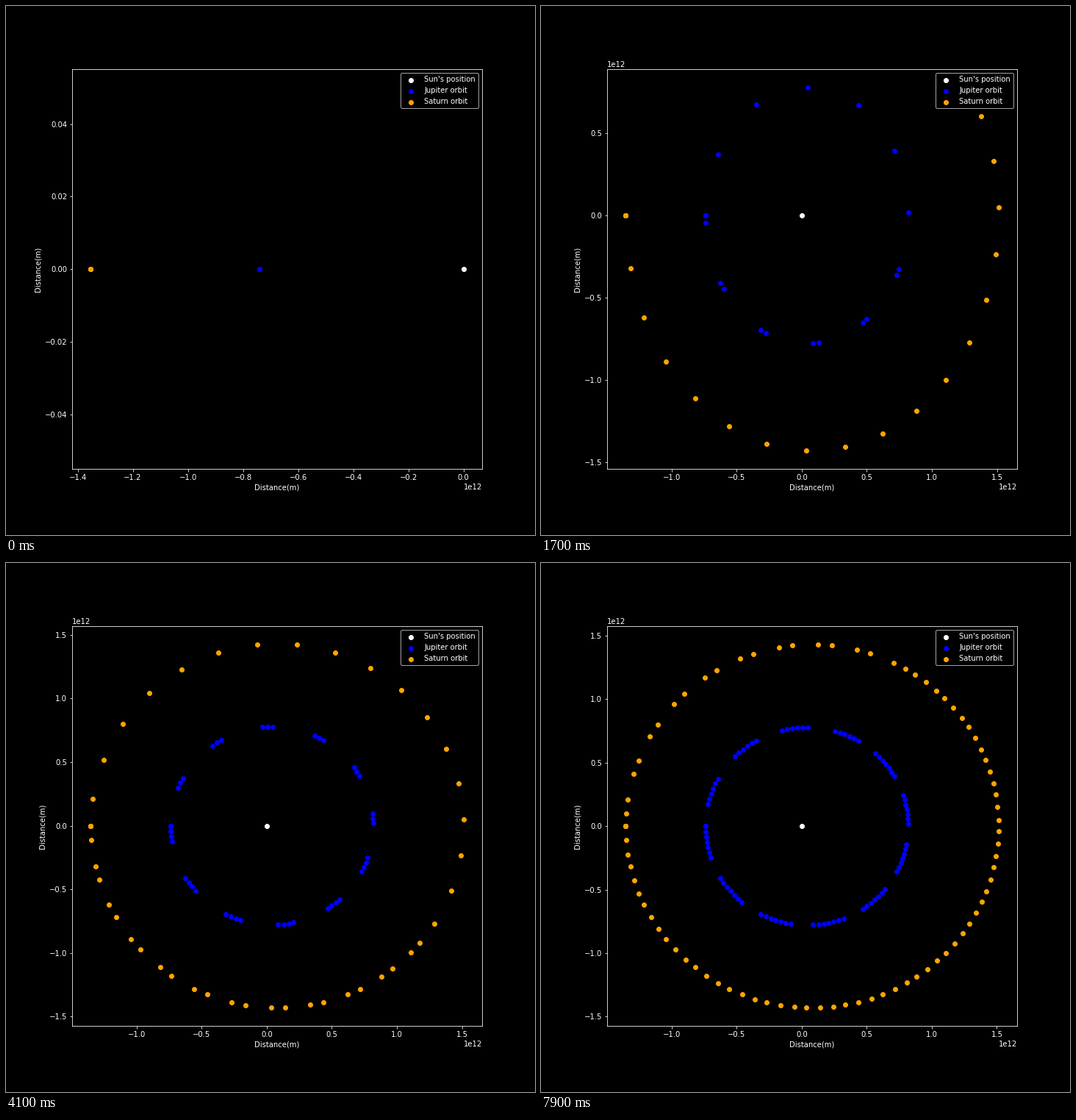
A matplotlib script that plays this animation: 720x720 px, repeating every 8000 ms.

```python
import matplotlib.pyplot as plt
import numpy as np
from matplotlib.animation import FuncAnimation

plt.style.use("dark_background")

GM = 6.67408e-11 * 1.989e30
YEAR = 365 * 86400.0
FRAMES = 80


def orbit(perihelion, speed, count):
    """Yearly positions on a Kepler orbit, starting at perihelion on the left."""
    a = 1 / (2 / perihelion - speed**2 / GM)
    e = 1 - perihelion / a
    mean = np.sqrt(GM / a**3) * YEAR * np.arange(count)
    ecc = mean.copy()
    for _ in range(20):
        ecc -= (ecc - e * np.sin(ecc) - mean) / (1 - e * np.cos(ecc))
    x = -a * (np.cos(ecc) - e)
    y = -a * np.sqrt(1 - e * e) * np.sin(ecc)
    return np.column_stack([x, y])


def limits(values, margin=0.05):
    lo, hi = min(values.min(), 0), max(values.max(), 0)
    if lo == hi:
        lo, hi = -0.05, 0.05
    pad = margin * (hi - lo)
    return lo - pad, hi + pad


jupiter = orbit(740.52e9, 13720, FRAMES)
saturn = orbit(1352.55e9, 10180, FRAMES)

fig, ax = plt.subplots(figsize=(10, 10), dpi=72)
fig.subplots_adjust(left=0.125, right=0.9, bottom=0.125, top=0.88)

ax.scatter(0, 0, color="white", label="Sun's position")
dots_j = ax.scatter(0, 0, color="blue", label="Jupiter orbit")
dots_s = ax.scatter(0, 0, color="orange", label="Saturn orbit")
ax.set_xlabel("Distance(m)")
ax.set_ylabel("Distance(m)")
ax.legend(loc="upper right")


def update(i):
    for dots, path in ((dots_j, jupiter), (dots_s, saturn)):
        # the starting dot is stamped three times, which firms up its edge
        dots.set_offsets(np.vstack([path[:1], path[:1], path[: i + 1]]))
    seen = np.vstack([jupiter[: i + 1], saturn[: i + 1]])
    ax.set_xlim(*limits(seen[:, 0]))
    ax.set_ylim(*limits(seen[:, 1]))
    return dots_j, dots_s


anim = FuncAnimation(fig, update, frames=FRAMES, interval=100,
                     repeat=True, repeat_delay=0, blit=False)
plt.show()
```
